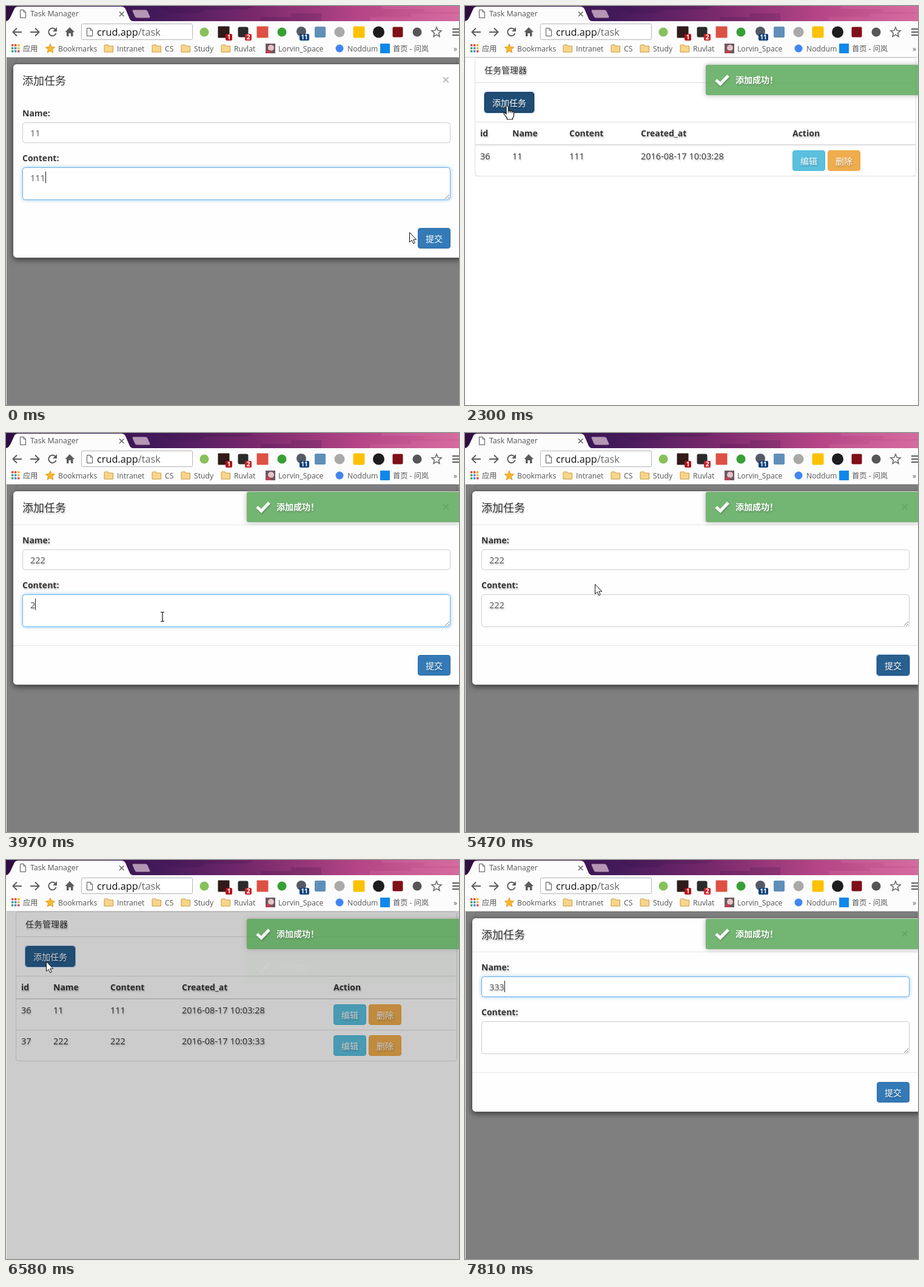
An HTML page that plays this animation: 747x658 px, repeating every 8 s.

```html
<!DOCTYPE html>
<html lang="zh-CN">
<head>
<meta charset="utf-8">
<title>Task Manager</title>
<style>
  html, body { margin: 0; width: 100%; height: 100%; overflow: hidden; background: #fff; }
  svg { display: block; width: 747px; height: 658px; }
  text { font: 14px "Open Sans", "Noto Sans CJK SC", "Noto Sans CJK", sans-serif; fill: #333; white-space: pre; }
  .b { font-weight: 700; }
  .n { font-size: 14.5px; }
  .h { font-size: 18px; }
  .w { fill: #fff; }
  .f { font-size: 14.5px; fill: #555; }
  .bm { font-size: 12.2px; fill: #555; }
  .mid { font-family: "Noto Sans CJK TC", "Noto Sans CJK", sans-serif; }
  .shade { filter: drop-shadow(1px 2px 1px rgba(0, 0, 0, .27)); }
  .plain .shade { filter: none; }
  .plain .rule { opacity: 0; }
  .line { stroke: #ddd; fill: none; }
  .field { fill: #fff; stroke: #ccc; }
  .field.on { stroke: #66afe9; filter: drop-shadow(0 0 3px rgba(102, 175, 233, .65)); }
  .ring { fill: none; stroke: #8fb6ee; visibility: hidden; }
  .hover .face { fill: #286090; stroke: #204d74; }
  .press .face { fill: #204d74; stroke: #122b40; }
  .ringed .ring { visibility: visible; }
  .box { fill: #fefefe; stroke: #555; filter: drop-shadow(0 3px 5px rgba(0, 0, 0, .5)); }
  .toast { fill: #51a351; filter: drop-shadow(0 0 4px #999); }
  .ui { fill: none; stroke: #5c5c5c; stroke-width: 2; }
</style>
</head>
<body>
<svg viewBox="0 0 747 658">
  <defs>
    <linearGradient id="sky">
      <stop offset="0" stop-color="#2f0d42"/><stop offset=".33" stop-color="#42195a"/>
      <stop offset=".55" stop-color="#79296c"/><stop offset=".78" stop-color="#b54586"/>
      <stop offset="1" stop-color="#d0659a"/>
    </linearGradient>
  </defs>
  <rect width="747" height="658" fill="#fff"/>
  <g id="page"></g>
  <rect id="veil" x="1" y="85" width="746" height="573"/>
  <g id="modal"></g>
  <g id="toasts"></g>
  <g id="chrome"></g>
  <g id="mouse">
    <path id="arrow" d="M.5 .5V16.5L4.2 13.2L6.7 18.8L9.2 17.7L6.8 12.2H11.7Z" fill="#fff" stroke="#111"/>
    <path id="hand" d="M-2 1.5Q-2 0 -.5 0T1.5 1.5V8Q3 6.5 4.5 8.3Q6 7 7.5 9Q9.5 8.2 10.5 10.5V15Q10.5 18 8.5 20V22H-.5V20Q-3 17 -5.8 13Q-6 10.5 -4 11L-2 13ZM1.5 8V11M4.5 8.3V11M7.5 9V11.5" fill="#fff" stroke="#111" stroke-width="1.2"/>
    <path id="beam" d="M-3 -7.5H3M0 -7.5V7.5M-3 7.5H3" stroke="#111" stroke-width="1.2"/>
  </g>
</svg>
<script>
const LOOP = 8000;
const $ = id => document.getElementById(id);

// ---- markup helpers ----
const text = (x, y, s, cls = '') => `<text x="${x}" y="${y}" class="${cls}">${s}</text>`;
const rect = (x, y, w, h, fill, r = 0, more = '') =>
  `<rect x="${x}" y="${y}" width="${w}" height="${h}" rx="${r}" fill="${fill}" ${more}/>`;
const dot = (x, y, r, fill) => `<circle cx="${x}" cy="${y}" r="${r}" fill="${fill}"/>`;
const path = (d, more) => `<path d="${d}" ${more}/>`;
const button = (x, y, w, label, fill, edge, id = '') => `<g id="${id}">
  ${rect(x + .5, y + .5, w - 1, 33, fill, 3.5, `class="face" stroke="${edge}"`)}
  ${rect(x - .5, y - .5, w + 1, 35, 'none', 3, 'class="ring"')}
  <g class="shade">${text(x + 13, y + 22.5, label, 'w')}</g></g>`;
const blue = (x, y, w, label, id) => button(x, y, w, label, '#337ab7', '#2e6da4', id);

const columns = [25, 78, 172, 290];
const row = (id, y, cells) => `<g id="${id}">
  <g class="shade">${cells.map((c, i) => text(columns[i], y + 24, c, 'n')).join('')}</g>
  ${button(540, y + 9, 54, '编辑', '#5bc0de', '#46b8da')}
  ${button(598, y + 9, 54, '删除', '#f0ad4e', '#eea236')}</g>`;

$('page').innerHTML =
  rect(16.5, 85.5, 727, 195, '#fff', 4, 'id="panel" class="line"') +
  path('M17 126.5H743M17 191.5H743M17 280.5H743', 'class="line"') +
  path('M17 229H743', 'class="line" stroke-width="2"') +
  `<g class="shade">${text(32, 111, '任务管理器')}
   ${['id', 'Name', 'Content', 'Created_at'].map((c, i) => text(columns[i], 215, c, 'b')).join('')}
   ${text(540, 215, 'Action', 'b')}</g>` +
  blue(32, 142, 82, '添加任务', 'add') +
  row('row1', 229, ['36', '11', '111', '2016-08-17 10:03:28']) +
  row('row2', 280, ['37', '222', '222', '2016-08-17 10:03:33']);

const field = (id, y, h) =>
  rect(27.5, y + .5, 705, h - 1, '#fff', 4, `id="${id}" class="field"`) +
  `<g class="shade"><text id="${id}Text" x="40" y="${y + 22.5}" class="f"></text></g>` +
  path(`M0 ${y + 7}V${y + 26}`, `id="${id}Caret" stroke="#222"`);

$('modal').innerHTML =
  rect(11.5, 95.5, 742, 320, '#fefefe', 6, 'class="box"') +
  path('M12 151.5H747M12 350.5H747', 'class="line rule" style="stroke:#e5e5e5"') +
  `<g class="shade">${text(27, 130, '添加任务', 'h')}${text(27, 182, 'Name:', 'b')}${text(27, 256, 'Content:', 'b')}</g>` +
  path('M721 117.5L729.5 126M729.5 117.5L721 126', 'stroke="#bbb" stroke-width="2"') +
  field('name', 192, 34) + field('body', 266, 54) +
  path('M724 318L731 311M728 318L731 315', 'stroke="#777"') +
  blue(679, 366, 54, '提交', 'send');

$('toasts').innerHTML = ['toast1', 'toast2'].map(id => `<g id="${id}">
  <rect x="397" y="97" width="353" height="50" rx="3" class="toast"/>
  <g class="shade">${path('M414 122L421 128.5L434 115', 'fill="none" stroke="#fff" stroke-width="5"')}
  ${text(446, 127, '添加成功<tspan class="mid">！</tspan>', 'b w')}</g></g>`).join('');

// ---- browser frame ----
const folder = x => path(`M${x} 65.5Q${x} 64 ${x + 1.5} 64H${x + 6}L${x + 7.5} 66H${x + 14.5}V76H${x}Z`,
  'fill="#f8d58c" stroke="#c99a3d"');
const star = (x, y, r) => 'M' + Array.from({ length: 10 }, (_, i) => {
  const a = i * Math.PI / 5, q = i % 2 ? r * .45 : r;
  return `${(x + q * Math.sin(a)).toFixed(1)} ${(y - q * Math.cos(a)).toFixed(1)}`;
}).join('L') + 'Z';
const badge = (x, w, fill, s) => rect(x, 46, w, 11, fill, 2) +
  `<text x="${x + w / 2}" y="55.3" text-anchor="middle" class="b w" style="font-size:10px">${s}</text>`;
const square = (x, y, s, fill, r = 1) => rect(x - s / 2, y - s / 2, s, s, fill, r);

const apps = ['#e5483d', '#e5483d', '#f2b51d', '#3aa757', '#4285f4', '#f2b51d', '#3aa757', '#4285f4', '#e5483d'];
const marks = [[28, '应用'], [86, 'Bookmarks'], [183, 'Intranet'], [262, 'CS'], [310, 'Study'], [376, 'Ruvlat'],
  [449, 'Lorvin_Space'], [563, 'Noddum'], [638, '首页 - 问岚'], [738, '»']];

$('chrome').innerHTML =
  rect(0, 0, 747, 25, 'url(#sky)') +
  path('M250 0H410L396 6H330L318 12H272ZM420 25V18H470V12H520V25Z', 'fill="#2d0c45" opacity=".18"') +
  path('M540 0H620V5H690V10H747V0ZM600 25V18H668V13H747V25Z', 'fill="#f08fb4" opacity=".14"') +
  path('M0 25Q5 24 8 17L14 4Q16 1 20 1H190Q195 1 197 5L203 19Q205 25 210 25Z', 'fill="#fcfcfc"') +
  path('M209 6H230Q233 6 234 9L238 18Q238 20 236 20H216Q213 20 212 17L208 8Z', 'fill="#b596b5" stroke="#4a2158"') +
  rect(0, 25, 747, 60, '#fcfcfc') + rect(0, 84, 747, 1, '#c8c8c8') + rect(0, 85, 1, 573, '#f4f4f4') +
  path('M23.5 6.5H29L32.5 10V19.5H23.5ZM29 6.5V10H32.5', 'fill="#fff" stroke="#555"') +
  `<text x="40" y="17" style="font-size:12.4px;fill:#555">Task Manager</text>` +
  path('M187 9.5L194.5 17M194.5 9.5L187 17', 'class="ui" style="stroke-width:1.4"') +
  path('M26 43H12M18 36.5L11.5 43L18 49.5M40 43H54M48 36.5L54.5 43L48 49.5', 'class="ui"') +
  path('M81.5 39A6.3 6.3 0 1 0 82.5 45', 'class="ui"') + path('M84 35V42H77Z', 'fill="#5c5c5c"') +
  path('M105 35L113 43H110.5V50H107V45H103.5V50H100V43H97.5Z', 'fill="#5c5c5c"') +
  rect(124.5, 29.5, 183, 26, '#fff', 2, 'stroke="#b4b4b4"') +
  path('M133.5 36.5H139L142.5 40V49.5H133.5ZM139 36.5V40H142.5', 'fill="#fff" stroke="#555"') +
  `<text x="150" y="49" style="font-size:16.3px;fill:#111">crud.app<tspan fill="#666">/task</tspan></text>` +
  dot(327, 43, 7.5, '#86c159') + square(359, 43, 19, '#301a1a') + badge(362, 11, '#b5121b', '1') +
  square(391, 43, 17, '#2b2b2b', 3) + badge(394, 11, '#c9252d', '2') +
  square(423, 43, 19, '#dd5145') + dot(455, 43, 7.5, '#36a035') +
  dot(487, 42, 8, '#555a66') + badge(484, 16, '#12427a', '11') +
  square(518, 43, 18, '#5f8fb8', 2) + dot(550, 43, 8.5, '#a9a9a9') + square(582, 43, 19, '#fbc102', 2) +
  dot(614.5, 43, 9.5, '#1d1d1f') + square(646, 43, 17, '#800f17', 2) + dot(678, 43, 7.5, '#565656') +
  path(star(710, 43.5, 8.5), 'fill="none" stroke="#666" stroke-width="1.5"') +
  path('M736 38H747M736 43H747M736 48H747', 'class="ui"') +
  apps.map((c, i) => rect(9 + i % 3 * 5, 63 + (i / 3 | 0) * 5, 3.4, 3.4, c)).join('') +
  path(star(73, 70.5, 8), 'fill="#fbb829" stroke="#e0931d"') +
  [162, 241, 289, 355].map(folder).join('') +
  rect(428, 62, 16, 16, '#6d5862') + dot(437, 69, 5, '#e4c3c4') + rect(429, 73, 8, 5, '#b8434f') +
  dot(550, 70, 6.5, '#4285f4') + square(625, 70, 16, '#0f88eb') +
  marks.map(([x, s]) => text(x, 75, s, 'bm')).join('');

// ---- timeline ----
// The picture refreshes in bursts: start, end, number of refreshes.
const bursts = [[140, 380, 3], [1070, 2000, 8], [2160, 3130, 8], [3280, 4210, 8],
  [4360, 5350, 8], [5470, 6460, 8], [6580, 7540, 8], [7660, 7810, 2]];
const ticks = [0, ...bursts.flatMap(([a, b, n]) =>
  Array.from({ length: n }, (_, i) => Math.floor((a + (b - a) * i / (n - 1)) / 10) * 10))];

const hides = [992, 5532], shows = [2375, 6520];
const names = [[0, '11'], [1000, ''], [3110, '2'], [3260, '22'], [3390, '222'], [5540, ''], [7520, '3'], [7650, '33'], [7790, '333']];
const bodies = [[0, '111'], [1000, ''], [3930, '2'], [4060, '22'], [4190, '222'], [5540, '']];
const focus = [[0, 'body'], [130, ''], [3000, 'name'], [3660, 'body'], [4850, ''], [7240, 'name']];
const addLook = [[0, ''], [1980, 'hover'], [2280, 'press ringed'], [2420, 'hover ringed'], [2560, ''], [5830, 'hover ringed'], [6700, '']];
const sendLook = [[0, ''], [130, 'hover'], [360, 'press ringed'], [1000, 'hover ringed'], [2400, ''],
  [4740, 'hover'], [4870, 'press ringed'], [5050, 'hover ringed'], [6500, '']];
const shape = [[0, 'arrow'], [130, 'hand'], [1180, 'arrow'], [1980, 'hand'], [2420, 'arrow'], [3000, 'beam'],
  [4480, 'arrow'], [4740, 'hand'], [5080, 'arrow'], [6300, 'hand'], [6570, 'arrow'], [7240, 'beam'], [7500, '']];
const track = [[0, 665, 373], [100, 665, 373], [260, 686, 358], [380, 687, 356], [1100, 687, 356], [2000, 70, 165],
  [2580, 70, 165], [2990, 240, 211], [3420, 240, 211], [3700, 258, 303], [4300, 258, 303], [4780, 688, 372],
  [5020, 688, 372], [5470, 214, 249], [5580, 214, 249], [6440, 66, 167], [6640, 66, 167], [7260, 250, 211]];

const clamp = v => Math.min(1, Math.max(0, v));
const ramp = (t, from, span) => clamp((t - from) / span);
const swing = p => .5 - Math.cos(p * Math.PI) / 2;
const easeOut = p => 1 - (1 - p) ** 2;
const last = (list, t) => list.findLast(k => k[0] <= t)[1];

function mouseAt(t) {
  const i = track.findLastIndex(k => k[0] <= t), a = track[i], b = track[i + 1] || a;
  const p = a === b ? 0 : swing((t - a[0]) / (b[0] - a[0]));
  return [a[1] + (b[1] - a[1]) * p, a[2] + (b[2] - a[2]) * p];
}

// Returns dialog opacity, dialog lift and backdrop opacity.
function dialog(t) {
  const open = shows.findLast(s => s <= t) ?? -1e4, close = hides.findLast(s => s <= t) ?? -2e4;
  if (close > open) {
    return [1 - ramp(t, close, 150), -80 * easeOut(ramp(t, close, 300)), .5 - .5 * ramp(t, close + 300, 150)];
  }
  return [ramp(t, open + 150, 150), -80 * (1 - easeOut(ramp(t, open + 150, 300))), .5 * ramp(t, open, 150)];
}

const see = (id, on) => $(id).style.visibility = on ? 'visible' : 'hidden';

function setField(id, value, on) {
  $(id).setAttribute('class', on ? 'field on' : 'field');
  $(id + 'Text').textContent = value;
  $(id + 'Caret').setAttribute('transform', `translate(${Math.floor(40 + 8.4 * value.length) + .5})`);
  see(id + 'Caret', on);
}

function draw(t) {
  const [alpha, lift, veil] = dialog(t);
  $('modal').setAttribute('opacity', alpha);
  $('modal').setAttribute('transform', `translate(0 ${lift})`);
  $('modal').setAttribute('class', t < 900 ? 'plain' : '');
  $('veil').setAttribute('opacity', veil);

  const [first, second] = hides.map(h => t >= h);
  see('row1', first);
  see('row2', second);
  $('panel').setAttribute('height', second ? 246 : 195);

  const old = swing(ramp(t, hides[0] - 20, 300)) * (1 - swing(ramp(t, 5680, 1000)));
  $('toast1').setAttribute('opacity', .8 * old);
  $('toast1').setAttribute('transform', `translate(0 ${second ? 56 : 0})`);
  $('toast2').setAttribute('opacity', .8 * swing(ramp(t, hides[1] - 20, 300)));

  const active = last(focus, t);
  setField('name', last(names, t), active === 'name');
  setField('body', last(bodies, t), active === 'body');
  $('add').setAttribute('class', last(addLook, t));
  $('send').setAttribute('class', last(sendLook, t));

  const [x, y] = mouseAt(t), now = last(shape, t);
  $('mouse').setAttribute('transform', `translate(${Math.round(x)} ${Math.round(y)})`);
  for (const id of ['arrow', 'hand', 'beam']) see(id, id === now);
}

const start = performance.now();
function frame() {
  const t = (performance.now() - start) % LOOP;
  draw(ticks.findLast(k => k <= t));
  requestAnimationFrame(frame);
}
frame();
</script>
</body>
</html>
```
